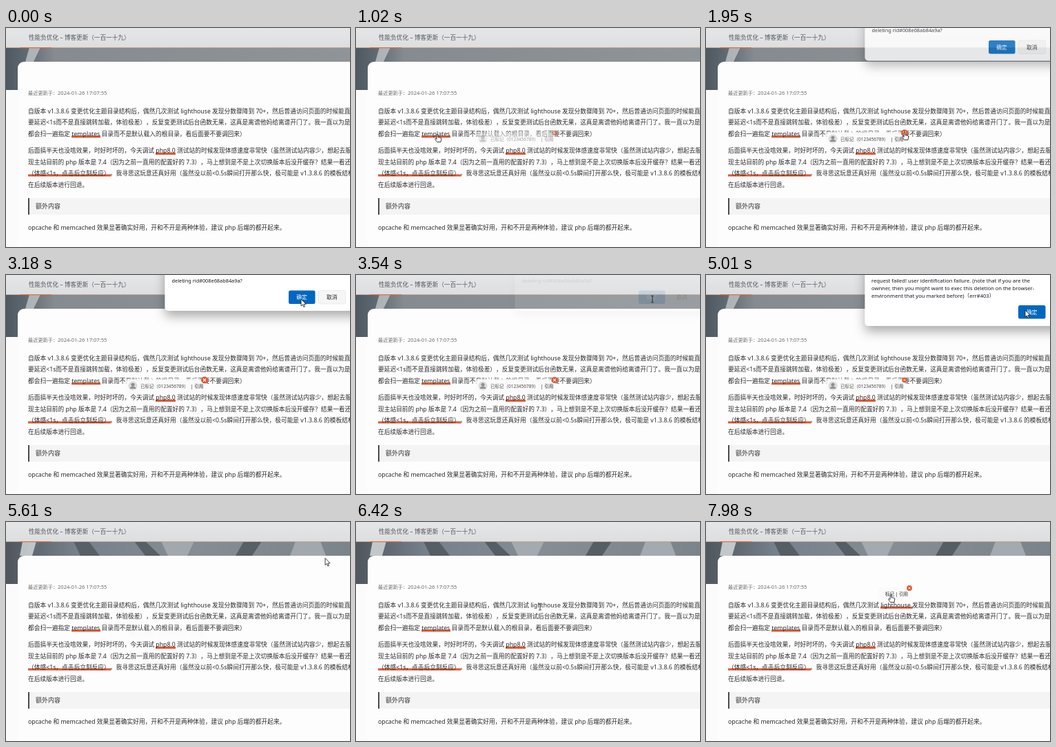
An HTML page that plays this animation: 499x318 px, repeating every 8 s.

```html
<!DOCTYPE html>
<html lang="zh-CN">
<head>
<meta charset="utf-8">
<title>博客更新</title>
<style>
  html, body { margin: 0; width: 100%; height: 100%; overflow: hidden; background: #fdfdfd; }
  svg { display: block; width: 100%; height: 100%; }
  text {
    font-family: "Noto Sans", "Noto Sans CJK SC", "Noto Sans CJK", sans-serif;
    white-space: pre; text-spacing-trim: space-all;
  }
  .body { font-size: 8.72px; fill: #2b2b2b; }
  .tip { font-size: 6.5px; fill: #222; }
  .msg { font-size: 7.6px; fill: #16181f; }
  .btn { font-size: 7.8px; text-anchor: middle; }
</style>
</head>
<body>
<svg viewBox="0 0 499 318" preserveAspectRatio="xMinYMin meet">
  <defs>
    <linearGradient id="head" x2="0" y2="1">
      <stop stop-color="#e5e6e8"/><stop offset="1" stop-color="#dcdee0"/>
    </linearGradient>
    <linearGradient id="photoA">
      <stop stop-color="#4d5860"/><stop offset=".06" stop-color="#5f6a72"/>
      <stop offset=".14" stop-color="#858b90"/><stop offset="1" stop-color="#8f9498"/>
    </linearGradient>
    <linearGradient id="photoB">
      <stop stop-color="#50565d"/><stop offset=".2" stop-color="#74808b"/>
      <stop offset=".55" stop-color="#868d94"/><stop offset="1" stop-color="#7b838b"/>
    </linearGradient>
    <filter id="shadow" x="-15%" y="-20%" width="130%" height="190%">
      <feDropShadow dx="0" dy="8" stdDeviation="8" flood-color="#000" flood-opacity=".32"/>
    </filter>
    <filter id="soft" x="-20%" y="-50%" width="140%" height="200%">
      <feGaussianBlur stdDeviation="1"/>
    </filter>
    <g id="close">
      <circle r="5" fill="#e5562f"/>
      <path d="M-2-2 2 2M2-2-2 2" stroke="#fff" stroke-width="1.2"/>
    </g>
  </defs>

  <rect width="499" height="318" fill="#fbfbfb"/>
  <rect y="28" width="499" height="62" fill="url(#photoA)"/>
  <path d="M34 28h16L40 49H28Z" fill="#c0c4c7" opacity=".8"/>
  <g id="late">
    <rect y="28" width="499" height="62" fill="url(#photoB)"/>
    <path d="M24 28h20l-6 21H20Z" fill="#c3c7ca"/>
    <path d="M98 28h22l16 21h-28ZM186 28h16l22 21h-22ZM345 28h26l-14 21h-24Z" fill="#555d65"/>
    <path d="M225 28h48l-10 21h-28ZM420 28h36l8 21h-52Z" fill="#a4aaaf"/>
  </g>
  <path d="M499 49H26a9 9 0 0 0-9 9V318H499Z" fill="#fdfdfd"/>
  <rect width="499" height="28" fill="url(#head)"/>
  <rect y="28" width="499" height="1" fill="#c9a592"/>
  <rect x="20" y="28" width="46" height="1.2" fill="#e0703f"/>
  <text x="33" y="17" font-size="8.62" fill="#55585c">性能负优化 – 博客更新（一百一十九）</text>
  <text x="32" y="97" font-size="7.2" fill="#6a6a6a">最近更新于：</text>
  <text x="75" y="97" font-size="7.55" fill="#6a6a6a">2024-01-26 17:07:55</text>

  <g id="marks"></g>
  <rect x="32" y="247" width="467" height="24" fill="#f4f4f4"/>
  <rect x="32" y="247" width="2" height="24" fill="#4a4a4a"/>
  <text x="43" y="262.3" font-size="9" fill="#333">额外内容</text>
  <g id="lines"></g>

  <g id="marked">
    <rect x="174" y="151" width="116" height="21" rx="4" fill="#fafafa" filter="url(#soft)"/>
    <circle cx="184" cy="161" r="6.5" fill="#dcdcdc"/>
    <circle cx="184" cy="159.3" r="2.5" fill="#8e8e8e"/>
    <path d="M179.4 164.9a4.7 3.8 0 0 1 9.2 0Z" fill="#8e8e8e"/>
    <text class="tip" x="195" y="163.8" style="fill:#4c4c4c">已标记（0123456789）</text>
    <text class="tip" x="268" y="163.8">| 引用</text>
    <use id="markedX" href="#close"/>
  </g>
  <g id="fresh">
    <rect x="250" y="95" width="49" height="17" rx="4" fill="#fafafa" filter="url(#soft)"/>
    <text class="tip" x="260" y="106.8">标记 | 引用</text>
    <use href="#close" transform="translate(295 96) scale(.78)"/>
  </g>

  <g id="ask">
    <rect x="230.5" y="-30" width="290" height="82" rx="5" fill="#fff" filter="url(#shadow)"/>
    <text class="msg" x="240.5" y="11" style="font-size:7.35px">deleting rid#008e68ab84a9a?</text>
    <rect x="410" y="22.5" width="38.5" height="19.5" rx="2.5" fill="#0067c0"/>
    <text class="btn" x="429" y="35.3" fill="#fff">确定</text>
    <rect x="453" y="22.5" width="39.5" height="19.5" rx="2.5" fill="#f6f6f6" stroke="#e2e2e2" stroke-width=".6"/>
    <text class="btn" x="472.7" y="35.3" fill="#222">取消</text>
  </g>
  <g id="fail">
    <rect x="230.5" y="-30" width="290" height="104" rx="5" fill="#fff" filter="url(#shadow)"/>
    <text class="msg" x="240" y="10.7">request failed! user identification failure. (note that if you are the</text>
    <text class="msg" x="240" y="21.8">ownner, then you might want to exec this deletion on the browser-</text>
    <text class="msg" x="240" y="32.9">environment that you marked before)（err#403）</text>
    <rect x="453" y="44" width="39.5" height="19.5" rx="2.5" fill="#0067c0"/>
    <text class="btn" x="472.7" y="56.8" fill="#fff">确定</text>
  </g>

  <g id="cursor">
    <path id="arrow" d="M0 0V10L2.3 7.9 3.9 11.5 5.5 10.8 3.9 7.3H7.2Z" fill="#fff" stroke="#111" stroke-width=".8"/>
    <path id="beam" d="M-1.8-5Q0-5 0-4Q0-5 1.8-5M0-4V4M-1.8 5Q0 5 0 4Q0 5 1.8 5" fill="none" stroke="#222" stroke-width=".9"/>
    <path id="hand" d="M-.9.8Q0-.6.9.8V4.4L5 5.3Q6 5.6 5.8 7L5 11.5H-.6L-3.4 7.4Q-3.2 6-2 6.5L-.9 7.5Z" fill="#fff" stroke="#111" stroke-width=".8"/>
  </g>
</svg>
<script>
const LOOP = 8000;
const $ = id => document.getElementById(id);

const lines = [
  [124, '自版本 v1.3.8.6 变更优化主题目录结构后，偶然几次测试 lighthouse 发现分数骤降到 70+，然后普通访问页面的时候能直'],
  [140, '要延迟<1s而不是直接跳转加载，体验极差），反复变更测试后台函数无果，这真是离谱他妈给离谱开门了。我一直以为是'],
  [156.5, '都会扫一遍指定 templates 目录而不是默认载入的根目录，看后面要不要调回来）'],
  [181, '后面搞半天也没啥效果，时好时坏的，今天调试 php8.0 测试站的时候发现体感速度非常快（虽然测试站内容少，想起去服'],
  [197.7, '现主站目前的 php 版本是 7.4（因为之前一直用的配置好的 7.3），马上想到是不是上次切换版本后没开缓存？结果一看还'],
  [214.3, '（体感<1s，点击后立刻反应），我寻思这玩意还真好用（虽然没以前<0.5s瞬间打开那么快，极可能是 v1.3.8.6 的模板结构'],
  [231, '在后续版本进行回退。'],
  [293, 'opcache 和 memcached 效果显著确实好用，开和不开是两种体验，建议 php 后端的都开起来。']
];

const NS = 'http://www.w3.org/2000/svg';
function add(parent, tag, attrs, text = '') {
  const el = document.createElementNS(NS, tag);
  for (const key in attrs) el.setAttribute(key, attrs[key]);
  el.textContent = text;
  parent.append(el);
  return el;
}
for (const [y, text] of lines) add($('lines'), 'text', { class: 'body', x: 32, y }, text);

const underline = (x, y, width) =>
  add($('marks'), 'rect', { x, y, width, height: 3, fill: '#de5733' });
underline(95, 156.3, 42);
underline(217, 181, 29);
underline(32, 212.5, 120);
const newMark = underline(253, 122.8, 47);

// time, x, y, pointer shape from then on
const path = [
  [150, 506, 112, 'beam'], [600, 190, 170, 'beam'], [840, 118, 154, 'hand'],
  [1080, 118, 154, 'hand'], [1620, 288, 151, 'hand'], [2060, 288, 151, 'arrow'],
  [2520, 427, 33, 'arrow'], [3150, 428, 35, 'arrow'], [3480, 430, 35, 'beam'],
  [4260, 430, 35, 'arrow'], [4900, 463, 51, 'arrow'], [5940, 463, 53, 'beam'],
  [6400, 267, 123, 'beam'], [7080, 267, 123, 'hand'], [7560, 268, 105, 'hand']
];

const clamp = v => Math.max(0, Math.min(1, v));
const ramp = (t, from, to) => {
  const p = clamp((t - from) / (to - from));
  return p * p * (3 - 2 * p);
};
const pulse = (t, a, b, c, d) => ramp(t, a, b) * (1 - ramp(t, c, d));

function show(id, opacity, transform = '') {
  const el = $(id);
  el.setAttribute('opacity', opacity);
  el.setAttribute('display', opacity > 0 ? 'inline' : 'none');
  el.setAttribute('transform', transform);
}

function dialog(id, t, open, close) {
  const slide = 1 - clamp((t - open) / 230);
  show(id, pulse(t, open, open + 132, close, close + 150), `translate(0 ${-13 * slide * slide})`);
}

function pointer(t) {
  let i = path.length - 1;
  while (i > 0 && path[i][0] > t) i--;
  const [t0, x0, y0, shape] = path[i];
  const [t1, x1, y1] = path[i + 1] || [LOOP, x0, y0];
  const p = ramp(t, t0, t1);
  const x = x0 + (x1 - x0) * p, y = y0 + (y1 - y0) * p;
  show('cursor', t < 150 ? 0 : 1, `translate(${x} ${y})`);
  for (const id of ['arrow', 'beam', 'hand'])
    $(id).setAttribute('display', id === shape ? 'inline' : 'none');
}

function draw(t) {
  show('late', ramp(t, 5040, 5700));
  show('marked', pulse(t, 900, 1140, 5340, 5640));
  const hover = pulse(t, 1500, 1680, 3450, 3700);
  $('markedX').setAttribute('transform', `translate(288 152.5) scale(${0.74 + 0.26 * hover})`);
  dialog('ask', t, 1858, 3420);
  dialog('fail', t, 3778, 5070);
  newMark.setAttribute('width', 47 * ramp(t, 6870, 7110));
  show('fresh', ramp(t, 6960, 7200));
  pointer(t);
}

function tick() {
  draw(performance.now() % LOOP);
  requestAnimationFrame(tick);
}
tick();
</script>
</body>
</html>
```
